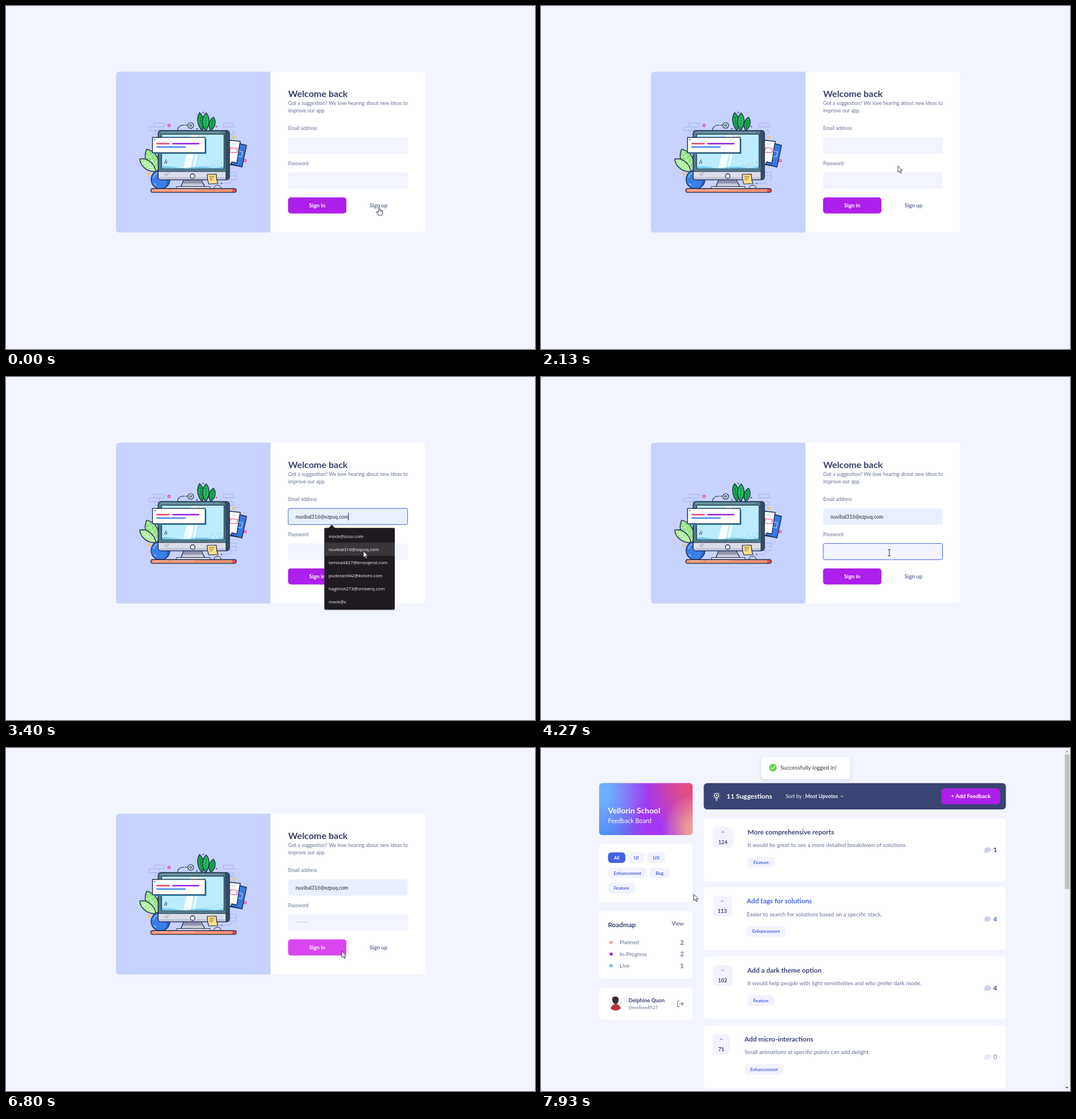
Animation, 928 px wide and 603 px high, one loop 8 s. Source, as an HTML page:

```html
<!DOCTYPE html>
<html lang="en">
<head>
<meta charset="utf-8">
<title>Feedback board sign-in</title>
<style>
  html, body { margin: 0; width: 100%; height: 100%; overflow: hidden; background: #f2f4ff; }
  svg { display: block; width: 928px; height: 603px; }
  text { font-family: Lato, "Open Sans", sans-serif; white-space: pre; }
  .menu text { font-family: "Open Sans", "Noto Sans", sans-serif; }
</style>
</head>
<body>
<svg id="stage" viewBox="0 0 928 603" xmlns="http://www.w3.org/2000/svg"></svg>
<script>
const LOOP = 8000, FPS = 15;
const PURPLE = '#ad1fea', HOT = '#d946ef', BLUE = '#4661e6', NAVY = '#3a4374',
      SLATE = '#647196', PALE = '#f2f4ff', INK = '#1b2a4c';
const EMAIL = 'nuvibal316@ezpuq.com';
const CHOICES = ['mock@zzuv.com', EMAIL, 'lomixa4827@brovqend.com',
                 'pudoran942@kvlomi.com', 'hagimot273@omberq.com', 'mock@z'];
const ROW = 23.15, MENU_TOP = 268;

// ---- drawing helpers ----
const rect = (x, y, w, h, fill, r = 0, more = '') =>
  `<rect x="${x}" y="${y}" width="${w}" height="${h}" rx="${r}" fill="${fill}" ${more}/>`;
const text = (x, y, s, size, fill, weight = 400, more = '') =>
  `<text x="${x}" y="${y}" font-size="${size}" fill="${fill}" font-weight="${weight}" ${more}>${s}</text>`;
const mid = 'text-anchor="middle"', end = 'text-anchor="end"';
const fillPath = (d, fill, more = '') => `<path d="${d}" fill="${fill}" ${more}/>`;
const line = (d, color, w = 1, more = '') =>
  `<path d="${d}" fill="none" stroke="${color}" stroke-width="${w}" stroke-linecap="round" stroke-linejoin="round" ${more}/>`;
const inked = (d, fill, w = 1.4) =>
  fillPath(d, fill, `stroke="${INK}" stroke-width="${w}" stroke-linejoin="round"`);
const dot = (x, y, r, fill, more = '') => `<circle cx="${x}" cy="${y}" r="${r}" fill="${fill}" ${more}/>`;
const ring = (x, y, color) => dot(x, y, 2, 'none', `stroke="${color}" stroke-width="1.4"`);
const oval = (x, y, rx, ry, fill, turn = 0) =>
  `<ellipse cx="${x}" cy="${y}" rx="${rx}" ry="${ry}" fill="${fill}" transform="rotate(${turn} ${x} ${y})"/>`;
const group = (id, body, more = '') => `<g id="${id}" ${more}>${body}</g>`;

function polar(cx, cy, n, radius, turn = 0) {
  let d = '';
  for (let i = 0; i < n; i++) {
    const a = turn + i / n * 2 * Math.PI, r = radius(i);
    d += `${i ? 'L' : 'M'}${(cx + r * Math.sin(a)).toFixed(1)} ${(cy - r * Math.cos(a)).toFixed(1)}`;
  }
  return d + 'Z';
}
const star = (x, y, r, fill, turn = 0) =>
  fillPath(polar(x, y, 10, i => i % 2 ? r * .55 : r, turn), fill,
           `stroke="${fill}" stroke-width="1.6" stroke-linejoin="round"`);
const fuzz = (x, y, r, fill) =>
  fillPath(polar(x, y, 50, i => i % 2 ? r * .93 : r * (1.06 + .05 * Math.sin(i * 2.7)), .1), fill,
           `stroke="${fill}" stroke-width="1" stroke-linejoin="round"`);

function leaf(x, y, len, w, turn, fill, vein) {
  let veins = `M0 -2V${-len + 4}`;
  for (let k = 1; k < 5; k++) {
    const v = -len * k / 6;
    veins += `M0 ${v}L${-w * .5} ${v - 4}M0 ${v}L${w * .5} ${v - 4}`;
  }
  const shape = `M0 0C${-w} ${-len * .3} ${-w} ${-len * .75} 0 ${-len}C${w} ${-len * .75} ${w} ${-len * .3} 0 0Z`;
  return `<g transform="translate(${x} ${y}) rotate(${turn})">${inked(shape, fill)}${line(veins, vein, .8)}</g>`;
}

// ---- illustrations ----
function computerArt() {
  const bricks = 'M260 206h17.500v6.500h-17.500zM251 212.500h18v6.500h-18zM262 219h15v6.500h-15z' +
    'M382 206h17v6.500h-17zM389 212.500h15M382 219h17v6.500h-17zM380 292h24v6.500h-24zM388 298.500v6.500h16v-6.500M376 311.500h18v-6.500';
  return line(bricks, '#a5b0ec', 1) +
    ring(286, 210, '#ec3f7c') + ring(400, 231, '#f4bd4f') + ring(419.5, 272, '#ec3f7c') + ring(251, 295, '#f4bd4f') +
    dot(346, 187, 1.5, '#5d62b8') + dot(369, 212, 1.3, '#8b3bb8') + dot(335, 216, 1.3, '#3d4a8c') + dot(378, 312, 1.2, BLUE) +
    line('M301 218Q302 210 311 209.500H318', INK, 1.2, 'stroke-dasharray="7 2"') +
    dot(324, 210, 5, '#d7e6f4', `stroke="${INK}" stroke-width="1.2"`) + dot(324, 210, 2, '#6fb98e', `stroke="${INK}" stroke-width=".7"`) +
    leaf(359, 219, 24, 7, 12, '#22ba59', '#0d6f3e') + leaf(344, 219, 32, 7, -8, '#20b656', '#0d6f3e') + leaf(350, 219, 31, 7.5, 2, '#2acb62', '#0d6f3e') +
    inked('M392 236L411 238L406 281L387 278Z', '#fff') + line('M394 249L406 250.500L405 258L392 257Z', '#ec3f7c', 1.1) + line('M395 242l8 1', '#b6c2dd') +
    inked('M410 242L422 245L414 283L394 278L396 274L405 276Z', '#3779e4') + line('M409 255l6 1.500l-2 9l-6-1.500', '#d8e8ff', .9) +
    leaf(267, 293, 46, 14, -26, '#8fe182', '#e6ffe0') + leaf(263, 291, 36, 10, -52, '#a6eb94', '#edffe8') +
    dot(271, 305, 16.5, '#3b7ee9', `stroke="${INK}" stroke-width="1.4"`) +
    fillPath('M276 290A16 16 0 0 1 278 319A23 23 0 0 0 276 290Z', '#2766c7') + line('M259 302q1-6 6-8M260 312l3 3', '#a9d0ff', 1.2) +
    inked('M312 305H342L350 320H306Z', '#c9cad9') + fillPath('M313 306h28l3 6h-34z', '#8e92ab') + inked('M299 317.500H358V321.500H299Z', '#e8e9f3', 1) +
    rect(267, 219, 125, 86.5, '#547f8d', 5, `stroke="${INK}" stroke-width="1.5"`) +
    fillPath('M384 220h4q3.500 0 3.500 4v80h-6z', '#334d62') + line('M272 222H376', '#8eb4bf', 1.2) +
    inked('M267 291H386V305.500H272Q267 305.500 267 301Z', '#dcdde9', 1.2) + fillPath('M268 301H385V305H272Q269 305 268 301Z', '#bfc2d7') +
    rect(273, 225.5, 109.5, 60.5, '#bcecff', 1, `stroke="${INK}" stroke-width="1.2"`) +
    fillPath('M325 226.500H337L324 285.500H311ZM340 226.500H343.500L330.500 285.500H327Z', '#f4fdff') +
    fillPath('M274 282q12-1 24 1.500t28 0 30 0 26-2v4H274Z', '#76cdf1') +
    line('M350 283v0m4-3v0m5 2v0m3-4v0m5 3v0m4-5v0m3 5v0m5-4v0m-2-3v0', '#4ea9d9', 1.3) + line('M278 277l3-7M281 277l1.500-4', INK, 1) +
    line('M278 296l4 0m1-2l3 0m-5 4l2 0', '#888cab', 1) +
    dot(327.5, 299, 4, '#fff', `stroke="${INK}" stroke-width="1.3"`) +
    rect(259.5, 233.5, 92, 26.5, '#2b9ac8') + rect(257, 231, 92.5, 27, '#fff', 0, `stroke="${INK}" stroke-width="1.4"`) +
    dot(261, 235, 1, INK) +
    line('M265 242H286', '#ef4270', 2.6) + line('M293 242H338', '#951fdc', 2.6) + line('M265 248H314', '#4388ea', 2.6) +
    inked('M353 296L369 295.500Q369 306 372 312L356 313Q353 306 353 296Z', '#ffe187', 1.2) + line('M357 299.500h8M357 302.500h7M358 305.500h4', '#5e552f', .9) +
    inked('M365 321.500Q365 315 371 315Q377 315 377.500 321.500Z', '#cdd0de', 1) +
    rect(254, 321, 150, 6.6, '#fb9374', 3.3, `stroke="${INK}" stroke-width="1.4"`) +
    fillPath('M397 321.700h3.500q3 .3 3 2.600t-3 2.600H397z', '#d94e50') + line('M260 323.200H284M290 323.200H330', '#ffd0bd', 1.1);
}

const eye = (x, y, r) => dot(x, y, r, '#fff') + dot(x - 1, y, r * .55, '#28304c') +
  dot(x - 2.5, y - 1.5, r * .17, '#fff');

function monster(x, y, r, body, shade) {
  return fuzz(x, y, r, shade) + fuzz(x - 1.5, y - 1.5, r * .94, body) +
    line(`M${x - r * .72} ${y - 5}q3-8 8-11M${x + r * .55} ${y + 8}l4-4M${x - r * .5} ${y + 14}l3 3`, '#ffffffaa', 1.5);
}
const feet = (x, y, c) => oval(x - 6, y, 5.5, 5, c) + oval(x + 6, y, 5.5, 5, c) + rect(x - 8, y - 8, 4, 8, c) + rect(x + 4, y - 8, 4, 8, c);

function monsterArt() {
  const bits = [[345, 211, 80, '#ec3f7c'], [353, 218, -35, '#3d8df0'], [368, 233, 20, '#3d8df0'], [374, 244, 15, '#ec3f7c'],
    [361, 246, -40, '#f4bd4f'], [301, 298, 35, '#f4bd4f'], [311, 299, -70, '#3d8df0'], [410, 301, 15, '#f6c39a'],
    [353, 231, -60, '#b7dd55'], [402, 321, -30, '#ccdc55']];
  let s = rect(317, 295, 19, 9, '#b0d0fb', 4.5) + rect(318, 342, 19, 8, '#b0d0fb', 4) + oval(344, 308, 20, 13, '#b7d4fc') + oval(336, 333, 16, 14, '#b9d5fc') +
    oval(320, 328, 3.5, 3.2, '#fff') + oval(324.5, 327.5, 3.5, 3.4, '#fff') +
    rect(234, 218.5, 114, 74, '#4970d5', 5) + rect(239, 218.5, 109, 74, '#87a4fb', 4) +
    fillPath('M240 283q27-7 54 0t54-3v9q0 3.500-4 3.500H240Z', '#7897f4') +
    fillPath('M270 219H279L260 292H251ZM283 219H287L268 292H264Z', '#adc1fd') +
    line('M245 223v0m3.500 0v0m3.500 0v0', '#3b5dbc', 2) +
    line('M249 229h12m11 1h12m24-2h8M260 234h8m24-1h4m24 2h8M327 230h7', '#d9e4ff', 1.4) +
    line('M250.500 246H323.500M250.500 253H302.500', '#4369ce', 3.8);
  for (let i = 0; i < 4; i++) s += star(255 + 16 * i, 270, 7, '#fff');
  for (const [x, y, a, c] of bits) s += rect(x - 2, y - .8, 4.5, 1.7, c, .5, `transform="rotate(${a} ${x} ${y})"`);
  s += line('M352 279L331 270', '#6ec3ef', 7) + star(324, 264, 11.5, '#eea834', .25) + star(323.5, 263, 10, '#fbc84e', .25) +
    line('M399 277Q407 280 408.500 289', '#6fc2ef', 7) + oval(394, 303, 6, 4.5, '#62b9ea', 50) +
    oval(375, 311, 7, 6, '#65b8e8') + monster(376, 280, 26.5, '#97dbfc', '#6bc5f1') + eye(374.5, 275.5, 9) +
    oval(350, 341, 6, 14, '#4870d8', 10) + oval(398, 342, 5.5, 13, '#4870d8', -8) + feet(374, 369, '#456cd2') +
    monster(373.5, 338, 27, '#86a2fa', '#678af0') + eye(373, 335, 9) +
    oval(296, 388, 4.5, 13, '#b743df', 8) + oval(314, 410, 6, 5.5, '#b435dd') + monster(319.5, 379, 26.5, '#d77bfa', '#bd4eeb') + eye(320, 376, 8.5) +
    fillPath('M332 422Q318 420 318.500 407Q318 392 332 390Q334 376 349 376Q360 376 365 385Q382 376 397 382Q412 379 413 393Q420 401 417 411Q414 422 404 422Z', '#a0df18') +
    fillPath('M324 418Q318 400 333 393Q337 379 350 380Q338 392 342 420Z', '#bced4c') + line('M334 387q2-6 8-8', '#e1ff9a', 2) +
    feet(371, 423, '#68bee9') + oval(346, 402, 4, 11, '#70c7ef', 8) + oval(396, 401, 4, 11, '#70c7ef', -8) +
    monster(371, 393, 27, '#a4e2fd', '#75caf2') + eye(371, 389, 8.5) + fillPath('M361 389Q362 379 371 379Q380 379 381 388Q371 384 361 389Z', '#76caf2');
  return s;
}

// ---- pages ----
const fieldY = i => 231 + 61.7 * i;

function formPage(o) {
  const split = (193 + o.right) / 2, x = o.x, b = o.bottom;
  let s = rect(193, 115.5, o.right - 193, b - 115.5, '#fff', 6) +
    fillPath(`M${split} 115.500H199q-6 0-6 6V${b - 6}q0 6 6 6H${split}Z`, '#c7d2fe') + o.art +
    text(x, 160, o.title, 16, '#373f68', 700);
  o.lines.forEach((l, i) => s += text(x, 174 + 13 * i, l, 8.85, SLATE));
  o.labels.forEach((l, i) => s += text(x, 218 + 61.7 * i, l, 8.5, SLATE) +
    rect(x, fieldY(i), o.w, 28.4, PALE, 3, `id="${o.id}Field${i}"`));
  const y = b - 61.7;
  return group(o.id, s + rect(x - .2, y - .1, o.bw + .3, 28.4, PURPLE, 5, `id="${o.id}Button"`) +
    text(x + o.bw / 2, y + 17.4, o.button, 9.6, '#fff', 700, mid) +
    text(o.linkX, y + 17.4, o.link, 9.6, SLATE, 700, mid));
}

const PILL = { All: 30.5, UI: 28.5, UX: 31.5, Enhancement: 68.5, Bug: 34.5, Feature: 47.5 };
const pill = (x, y, s, on) => rect(x, y, PILL[s], 18.5, on ? BLUE : '#f3f2ff', 6) +
  text(x + PILL[s] / 2, y + 12.2, s, 8, on ? '#fff' : BLUE, 700, mid);
const chevron = (x, y, c, up) => line(`M${x - 2} ${y + up}l2 ${-2 * up}l2 ${2 * up}`, c, 1);

const CARDS = [
  [124, 36, 362.5, 'More comprehensive reports', 'It would be great to see a more detailed breakdown of solutions.', 'Feature', 1],
  [113, 34, 360.7, 'Add tags for solutions', 'Easier to search for solutions based on a specific stack.', 'Enhancement', 4],
  [102, 35, 362, 'Add a dark theme option', 'It would help people with light sensitivities and who prefer dark mode.', 'Feature', 4],
  [71, 30.5, 357, 'Add micro-interactions', 'Small animations at specific points can add delight.', 'Enhancement', 0]
];
const cardY = i => 123.4 + 121.4 * i;

function card([votes, w, x, title, note, tag, count], i) {
  const y = cardY(i), cx = 301 + w / 2;
  return rect(285.5, y, 530, 111, '#fff', 6) + rect(301, y + 15.5, w, 36, '#f3f2ff', 6) +
    chevron(cx, y + 24.3, BLUE, 1) + text(cx, y + 45.3, votes, 9.2, NAVY, 700, mid) +
    text(x, y + 28.3, title, 11.8, NAVY, 700, `class="hover${i}"`) + text(x, y + 50.8, note, 9.95, SLATE) +
    pill(x, y + 68.3, tag) +
    `<g ${count ? '' : 'opacity=".5"'}>` + oval(783.5, y + 55.7, 5.8, 4.6, '#cdd2ee') +
    fillPath(`M778 ${y + 56}l0 5l5-1z`, '#cdd2ee') +
    text(800, y + 59.8, count, 11.3, NAVY, 700, `${end} class="hover${i}"`) + '</g>';
}

function boardPage() {
  const glow = (id, cx, cy, r, c) => `<radialGradient id="${id}" gradientUnits="userSpaceOnUse" cx="${cx}" cy="${cy}" r="${r}">` +
    `<stop offset="0" stop-color="${c}"/><stop offset=".3" stop-color="${c}" stop-opacity=".85"/><stop offset="1" stop-color="${c}" stop-opacity="0"/></radialGradient>`;
  let s = '<defs>' + glow('ga', 98, 75, 92, '#66bdfb') + glow('gb', 100, 158, 85, '#3f8ff2') +
    glow('gc', 270, 68, 90, '#e8507a') + glow('gd', 274, 142, 62, '#f5a88b') + '</defs>';
  for (const f of ['#a336f5', 'url(#gb)', 'url(#ga)', 'url(#gc)', 'url(#gd)']) s += rect(102, 61.7, 164, 91.3, f, 6);
  s += text(117.5, 114.5, 'Vellorin School', 13.8, '#fff', 700) + text(117.5, 132.3, 'Feedback Board', 10.8, '#fff') +
    rect(102, 168.3, 164, 102.7, '#fff', 6) + pill(117.5, 183.4, 'All', true) + pill(153, 183.4, 'UI') + pill(186.5, 183.4, 'UX') +
    pill(117.5, 210.3, 'Enhancement') + pill(191, 210.3, 'Bug') + pill(117.5, 237.2, 'Feature') +
    rect(102, 287, 164, 119, '#fff', 6) + text(117.5, 314.5, 'Roadmap', 11.7, NAVY, 700) + text(250.5, 312, 'View', 9.6, NAVY, 400, end);
  [['Planned', 2, '#f49f85'], ['In-Progress', 2, PURPLE], ['Live', 1, '#62bcfa']].forEach(([name, n, c], i) => {
    const y = 341.7 + 20.5 * i;
    s += dot(123, y, 2.8, c) + text(138, y + 3.6, name, 9.6, SLATE) + text(250.5, y + 3.9, n, 11.2, SLATE, 700, end);
  });
  s += rect(102, 421.4, 164, 56.2, '#fff', 6) + dot(130, 449.5, 12, '#f4f4f6') +
    fillPath('M125 443q-1-7 6-6q6 0 5 7q-1 6-5 6q-5 0-6-7z', '#3a2a33') + fillPath('M122 458q3-8 9-8q7 0 9 8q-9 7-18 0z', '#b8323c') +
    text(153.5, 446.6, 'Delphine Quon', 9.4, NAVY, 700) + text(153.5, 459, '@mellow4927', 8.2, SLATE) +
    line('M243 445H239.500V454.500H243M242.500 449.700H249.500M247 447l2.600 2.700l-2.600 2.700', SLATE, 1.1) +
    rect(285.5, 61.7, 530, 46.2, NAVY, 6) +
    dot(308, 83.5, 3.8, 'none', 'stroke="#fff" stroke-width="1.3"') + dot(308, 83.5, 1.4, '#fff') +
    line('M306.500 88.500h3M306.500 90.500h3M307.500 92.300h1', '#fff', 1.2) +
    line('M301.800 84h.5M313.700 84h.5M303.500 79.500l.4.4M312.500 79.500l-.4.4M303.500 88.300l.4-.4M312.500 88.300l-.4-.4', '#fff', 1) +
    text(325.5, 89, '11', 11.9, '#fff', 700) + text(342, 89, 'Suggestions', 11.9, '#fff', 700) +
    text(429, 88.2, 'Sort by :', 9, PALE) + text(463.5, 88.2, 'Most Upvotes', 9.2, PALE, 700) + chevron(528, 85, '#fff', -1) +
    rect(702.5, 71, 103, 28, PURPLE, 6) + text(754, 88.3, '+ Add Feedback', 9.8, '#fff', 700, mid) +
    CARDS.map(card).join('');
  const toast = rect(386, 18, 156.5, 39, '#2a2f55', 6, 'opacity=".13" filter="url(#soft)"') +
    rect(386, 15.5, 156.5, 39.3, '#fff', 6) + group('badge', dot(0, 0, 6.7, '#61d345')) +
    line('M404 34.800l2.200 2.200l4-4.600', '#fff', 1.5, 'id="tick" stroke-dasharray="9.3"') +
    text(420, 38.2, 'Successfully logged in!', 10.1, '#363636');
  return group('board', s + '<filter id="soft"><feGaussianBlur stdDeviation="3"/></filter>' + group('toast', toast));
}

function menu() {
  let s = fillPath('M565.500 266L571.500 259.500L577.500 266Z', '#1f1a20') +
    rect(558.5, 266.5, 123.5, 144, '#222', 3, 'opacity=".25"') + rect(558.5, 265.3, 123.5, 143.7, '#1f1a20', 2) +
    rect(558.5, 0, 123.5, ROW, '#3a353b', 0, 'id="pick"');
  CHOICES.forEach((c, i) => s += text(566, 282.5 + ROW * i, c, 7.9, '#fff'));
  return group('menu', s, 'class="menu"');
}

const pen = 'stroke="#26263a" stroke-width=".9" stroke-linejoin="round"';
const cursors = group('arrow', fillPath('M0 0V11.200L2.600 8.900L4.400 13L6.200 12.200L4.400 8.200H7.900Z', '#fff', pen)) +
  group('hand', fillPath('M-1.300 1.300Q0-.8 1.300 1.300V5.500L5.200 6.500Q6.500 7 6.400 8.800L5.800 12L4.600 15H-1L-4.600 10Q-5 8.200-3.300 8.300L-1.300 10Z', '#fff', pen) +
    line('M1.300 5.500v3M3.300 6v2.500M5 6.700v2', '#26263a', .6)) +
  group('beam', line('M-2.200-5.500H-.6L0-5L.6-5.500H2.200M0-5V5M-2.200 5.500H-.6L0 5L.6 5.500H2.200', '#2b2b33', 1));

document.getElementById('stage').innerHTML = rect(0, 0, 928, 603, PALE) +
  formPage({ id: 'signin', x: 495, w: 209.5, right: 735, bottom: 398.2, art: computerArt(), title: 'Welcome back',
    lines: ['Got a suggestion? We love hearing about new ideas to', 'improve our app.'],
    labels: ['Email address', 'Password'], bw: 102, button: 'Sign in', linkX: 653.5, link: 'Sign up' }) +
  group('entry', text(508, 248.6, '', 8.8, '#1d2440', 400, 'id="email"') + group('dots', '') +
    rect(0, 0, .9, 13, '#111', 0, 'id="caret"') + menu()) +
  formPage({ id: 'signup', x: 489.5, w: 204, right: 724.5, bottom: 521.5, art: monsterArt(), title: 'Get started',
    lines: ['Got a suggestion? We love hearing about new ideas', 'to improve our app.'],
    labels: ['Full Name', 'Email address', 'Password', 'Confirm password'], bw: 99, button: 'Sign up', linkX: 643.5, link: 'Sign in' }) +
  line('M629.500 479.500H658', SLATE, 1, 'id="under"') + boardPage() +
  group('bar', rect(918, 0, 10, 603, '#f1f1f1') + rect(919, 11.5, 8, 10, '#c1c1c1', 0, 'id="thumb"') +
    fillPath('M920 7.500h5l-2.500-3z', '#a3a3a3') + fillPath('M920 595.800h5l-2.500 3z', '#505050')) +
  group('cursor', cursors);

// ---- animation ----
const $ = id => document.getElementById(id);
const show = (id, on) => $(id).style.display = on ? '' : 'none';
const set = (id, attrs) => { for (const k in attrs) $(id).setAttribute(k, attrs[k]); };
const clamp = v => Math.max(0, Math.min(1, v));
const inside = (p, x, y, w, h) => p.x >= x && p.x <= x + w && p.y >= y && p.y <= y + h;

const PATH = [[0, 654.5, 353], [733, 654.5, 353], [1000, 652, 474], [1133, 659, 483], [1200, 659, 483], [1400, 649, 478],
  [1590, 649, 478], [2133, 626, 281], [2400, 627, 246], [2800, 627, 246], [3200, 627, 306], [3467, 627, 306],
  [4000, 611, 309], [5867, 611, 309], [6533, 589, 357], [7000, 589, 357], [7400, 585, 392], [7467, 585, 392], [7933, 268, 257]];
const KEYS = [4467, 4667, 4867, 5067, 5267, 5467, 5733, 5933];

function pointer(t) {
  const i = PATH.findIndex(k => k[0] > t);
  if (i < 0) return { x: 268, y: 257 };
  const [t0, x0, y0] = PATH[i - 1], [t1, x1, y1] = PATH[i];
  const u = (t - t0) / (t1 - t0), e = u * u * (3 - 2 * u);
  return { x: x0 + (x1 - x0) * e, y: y0 + (y1 - y0) * e };
}
const cardAt = p => CARDS.findIndex((c, i) => inside(p, 285.5, cardY(i), 530, 111));

function drawEntry(t, p) {
  const open = t >= 2460 && t < 3530, inMail = t >= 2460 && t < 3930, inPass = t >= 3930 && t < 6530;
  const row = open && p.y > MENU_TOP ? Math.floor((p.y - MENU_TOP) / ROW) : -1;
  const value = t >= 3530 ? EMAIL : row < 0 ? '' : CHOICES[row];
  const typed = KEYS.filter(k => k <= t + 5).length;
  show('menu', open);
  show('pick', row >= 0);
  set('pick', { y: MENU_TOP + ROW * row });
  $('email').textContent = value;
  const edge = on => on ? BLUE : 'none';
  set('signinField0', { fill: value ? '#e8f0fe' : PALE, stroke: edge(inMail) });
  set('signinField1', { stroke: edge(inPass) });
  let dots = '';
  for (let i = 0; i < typed; i++) dots += dot(509.4 + 2.7 * i, 306, .55, '#373f68', 'opacity=".85"');
  $('dots').innerHTML = dots;
  show('caret', inMail || inPass && !(t >= 4260 && t < 4460));
  set('caret', inMail ? { x: 508 + (value ? $('email').getComputedTextLength() : 0), y: 239 }
                      : { x: 508 + 2.7 * typed, y: 300.7 });
  set('signinButton', { fill: inside(p, 495, 336.5, 102, 28.2) ? HOT : PURPLE });
  return open;
}

function drawToast(t) {
  const s = t - 6900, u = 1 - (1 - clamp(s / 350)) ** 3, k = .6 + .4 * u;
  set('toast', { opacity: s < 0 ? 0 : .5 + .5 * u,
    transform: `translate(464 ${35 - 78 * (1 - u)}) scale(${k}) translate(-464 -35)` });
  const b = clamp((s - 100) / 260), pop = 1 + 2.4 * (b - 1) ** 3 + 1.4 * (b - 1) ** 2;
  set('badge', { transform: `translate(407 34.600) scale(${Math.max(0, pop)})` });
  set('tick', { 'stroke-dashoffset': 9.3 * (1 - clamp((s - 300) / 160)), opacity: s > 300 ? 1 : 0 });
}

function draw(time) {
  // whole steps at 15 per second, with a little slack for rounded times
  const t = Math.floor(time % LOOP * FPS / 1000 + .08) * 1000 / FPS % LOOP;
  const page = t < 460 ? 'signin' : t < 1595 ? 'signup' : t < 6860 ? 'signin' : 'board';
  const p = pointer(t);
  let shape = 'arrow';
  for (const id of ['signin', 'signup', 'board']) show(id, id === page);
  show('entry', page === 'signin');
  show('bar', page !== 'signin');
  set('thumb', { height: page === 'signup' ? 568.5 : 236.5 });

  const onLink = page === 'signup' && inside(p, 629, 468, 29, 13);
  show('under', onLink);
  if (page === 'signin') {
    const open = drawEntry(t, p);
    if (inside(p, 637, 344, 33, 14)) shape = 'hand';
    else if (!(open && p.y > 260) && [0, 1].some(i => inside(p, 495, fieldY(i), 209.5, 28.4))) shape = 'beam';
  } else if (page === 'signup') {
    if (onLink) shape = 'hand';
    else if ([0, 1, 2, 3].some(i => inside(p, 489.5, fieldY(i), 204, 28.4))) shape = 'beam';
  } else {
    drawToast(t);
    if (cardAt(p) >= 0) shape = 'hand';
    const lit = cardAt(pointer(t - 130));
    CARDS.forEach((c, i) => document.querySelectorAll('.hover' + i)
      .forEach(el => el.setAttribute('fill', i === lit ? BLUE : NAVY)));
  }
  for (const id of ['arrow', 'hand', 'beam']) show(id, id === shape);
  set('cursor', { transform: `translate(${p.x.toFixed(1)} ${p.y.toFixed(1)})` });
}

const start = performance.now();
function tick() {
  draw(performance.now() - start);
  requestAnimationFrame(tick);
}
tick();
</script>
</body>
</html>
```
